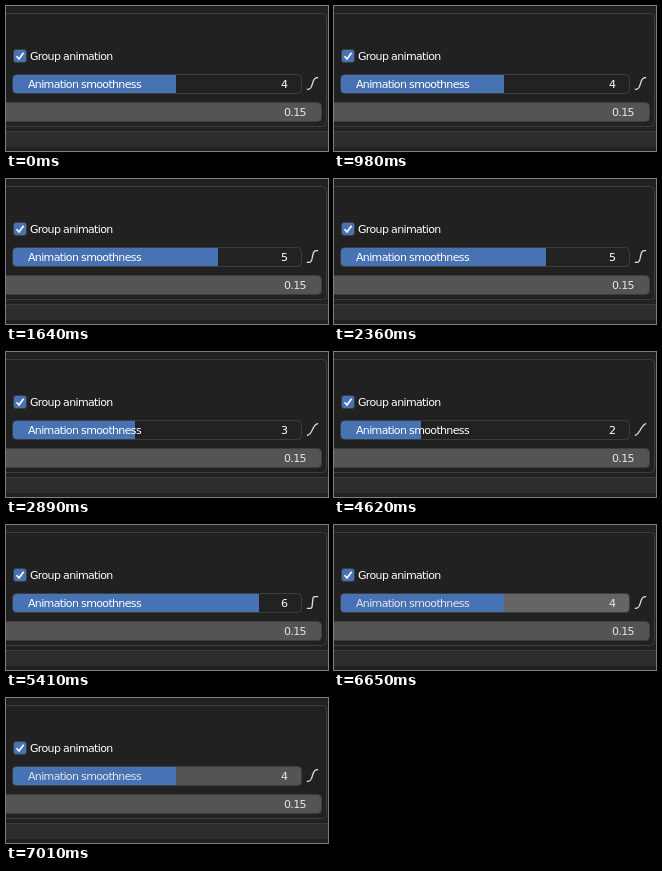
An HTML page for the animation above (7.54 s loop, 322 by 145 pixels).

```html
<!DOCTYPE html>
<html lang="en">
<head>
<meta charset="utf-8">
<title>Animation smoothness</title>
<style>
  html, body { margin: 0; width: 100%; height: 100%; overflow: hidden; background: #212121; }
  svg { display: block; width: 322px; height: 145px; }
  text { font: 11px "DejaVu Sans", sans-serif; letter-spacing: -0.65px; fill: #fff; white-space: pre; }
  .line { fill: none; stroke: #3d3d3d; }
</style>
</head>
<body>
<svg viewBox="0 0 322 145">
  <defs>
    <clipPath id="inner"><rect x="7" y="69" width="288" height="18" rx="3.5"/></clipPath>
  </defs>

  <rect width="322" height="145" fill="#212121"/>
  <rect y="126" width="322" height="15" fill="#2d2d2d"/>
  <path class="line" d="M0 125.5H322"/>
  <rect class="line" x="-10" y="7.5" width="330.5" height="113" rx="4"/>

  <rect x="7.5" y="43.5" width="13" height="13" rx="2.5" fill="#4772b3" stroke="#3d3d3d"/>
  <path d="M10.5 50.2L13 53L17.6 46.8" fill="none" stroke="#fff" stroke-width="1.7"/>
  <text x="24" y="54">Group animation</text>

  <rect id="slot" x="6.5" y="68.5" width="289" height="19" rx="4" stroke="#3d3d3d"/>
  <rect id="fill" x="7" y="69" height="18" fill="#4772b3" clip-path="url(#inner)"/>
  <text id="label" x="22" y="82">Animation smoothness</text>
  <text id="value" x="275" y="82"></text>
  <path id="curve" fill="none" stroke="#dedede" stroke-width="1.3" stroke-linejoin="round"/>

  <rect id="row" x="-10" y="96.5" width="325.5" height="19" rx="4" stroke="#3d3d3d"/>
  <text x="278" y="110" style="fill:#e6e6e6">0.15</text>
</svg>
<script>
const LOOP = 7540, RELEASE = 6650;

// Each drag: values reached, then the times at which they are reached
const drags = [
  ["4", [0]],
  ["56", [120, 400]],
  ["543210", [890, 950, 1010, 1070, 1160, 1250]],
  ["12456", [1460, 1520, 1580, 1640, 1700]],
  ["54321", [1880, 1910, 1940, 1970, 2000]],
  ["23456", [2120, 2150, 2180, 2210, 2240]],
  ["543", [2360, 2390, 2420]],
  ["45", [2540, 2570]],
  ["432", [2740, 2770, 2800]],
  ["345", [2890, 2920, 2950]],
  ["432", [3130, 3160, 3190]],
  ["1", [3370]],
  ["2345", [3620, 3700, 3770, 3860]],
  ["6", [4080]],
  ["5432", [4260, 4350, 4440, 4620]],
  ["3456", [5110, 5200, 5320, 5410]],
  ["54", [5890, 5980]]
];
const steps = drags.flatMap(([vals, times]) => times.map((t, i) => [t, +vals[i]]));
const powers = [1, 1.3, 1.7, 2.1, 3.4, 5.5, 14];
const el = id => document.getElementById(id);
const slot = el("slot"), fill = el("fill"), label = el("label"),
      value = el("value"), curve = el("curve"), row = el("row");

const easeInOut = (x, p) =>
  x < 0.5 ? (2 * x) ** p / 2 : 1 - (2 - 2 * x) ** p / 2;

function curvePath(v) {
  const pts = [];
  for (let i = 0; i <= 48; i++) {
    const x = i / 48;
    const y = easeInOut(x, powers[v]);
    pts.push((300.8 + 11.4 * x).toFixed(2) + " " + (83.3 - 11.6 * y).toFixed(2));
  }
  return "M" + pts.join("L");
}
const curves = powers.map((p, v) => curvePath(v));

function draw(t) {
  let v = 4;
  for (const [at, next] of steps) if (t >= at) v = next;
  const held = t < RELEASE;
  const slotHover = !held && t < 6770;
  const rowHover = t >= 6770 && t < 6900;

  fill.setAttribute("width", v ? Math.round(4.6 + 41.4 * v) - 7 : 0);
  value.textContent = v;
  curve.setAttribute("d", curves[v]);
  slot.setAttribute("fill", held ? "#222222" : slotHover ? "#656565" : "#545454");
  row.setAttribute("fill", rowHover ? "#656565" : "#545454");
  label.style.fill = value.style.fill = held ? "#fff" : "#e6e6e6";
}

const start = performance.now();
function tick(now) {
  draw(Math.max(0, now - start) % LOOP);
  requestAnimationFrame(tick);
}
draw(0);
requestAnimationFrame(tick);
</script>
</body>
</html>
```
